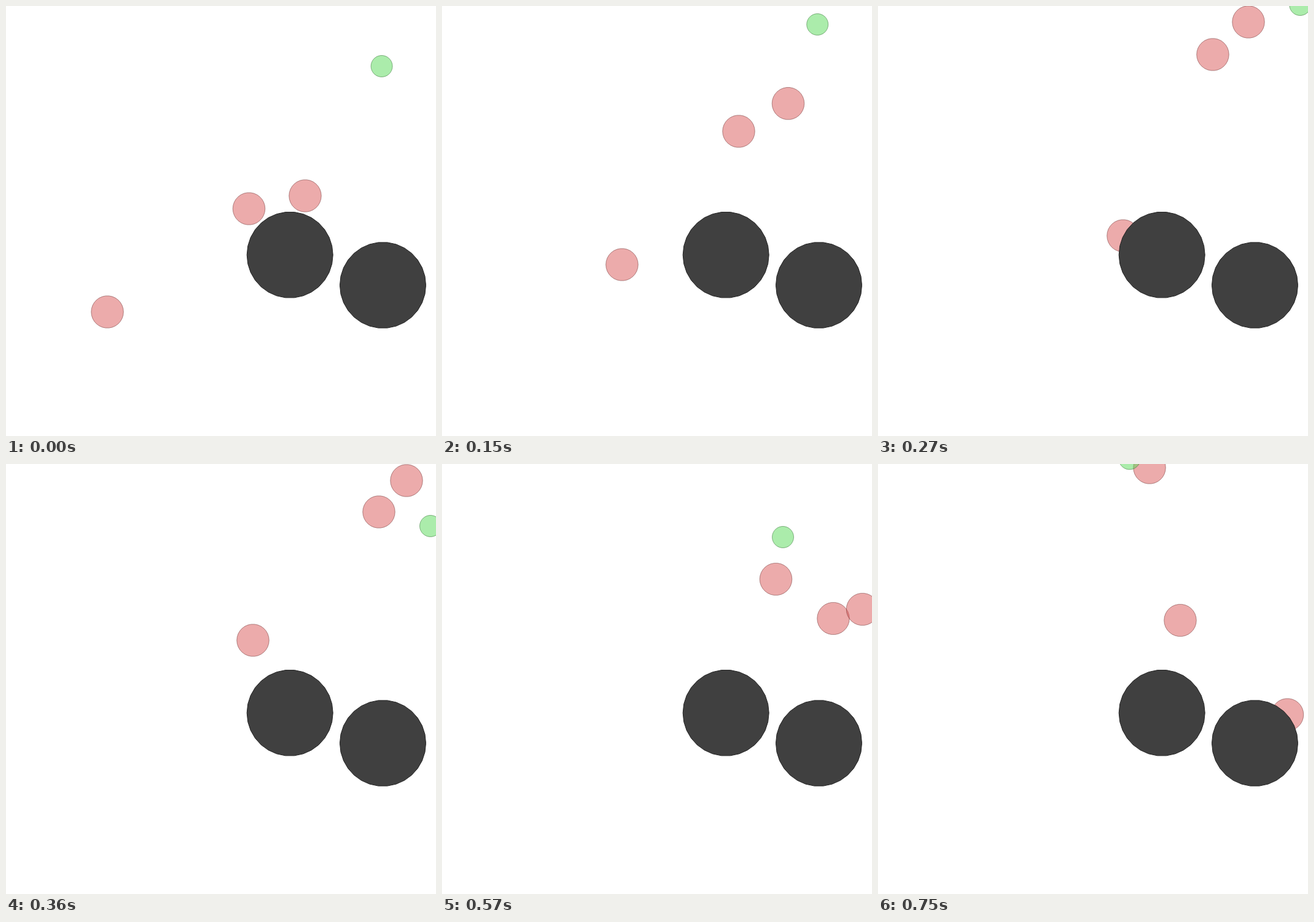
Write an HTML page with a canvas that moves like this. It is 700 px wide and 700 px high and loops after 780 ms.

```html
<!DOCTYPE html>
<html lang="en">
<head>
<meta charset="utf-8">
<title>Pursuit</title>
<style>
  html, body { margin: 0; width: 100%; height: 100%; overflow: hidden; background: #fff; }
  canvas { display: block; width: 700px; height: 700px; }
</style>
</head>
<body>
<canvas id="stage" width="700" height="700"></canvas>
<script>
const ctx = document.getElementById("stage").getContext("2d");
const STEP_MS = 30, STEPS = 26, SIDES = 30;
const RED = [217, 89, 89], GREEN = [89, 217, 89], GREY = [64, 64, 64];

// Every route passes through its key points at these shared steps.
const keySteps = [0, 5, 7, 9, 12, 15, 19, 21, 25];

const chaser = route => ({ color: RED, radius: 26.25, route });
const runner = route => ({ color: GREEN, radius: 17.5, route });

const agents = [
  chaser([[165, 498], [293, 421], [351, 393], [399, 374], [402, 287],
          [473.6, 237], [543.5, 187.5], [517, 123], [442, 6]]),
  chaser([[395.5, 330], [483, 204], [514, 142], [545, 79], [607, 78],
          [652, 152], [637, 251.5], [601.3, 266], [492, 254.5]]),
  chaser([[487, 309], [563.5, 158.7], [583, 92], [603, 26], [652, 27],
          [669.8, 104], [684.5, 236.5], [676.7, 306], [666.5, 408]]),
  runner([[611.6, 98], [611.2, 30], [639, -25], [687.2, -2], [691, 101],
          [610, 213.4], [555, 119], [520.6, 61.2], [409.5, -8.5]])
];

const obstacles = [[462.2, 405.2], [613.5, 454.5]];

// Slope of a smooth curve at key i: neighbouring chords, weighted by nearness.
function slope(values, i) {
  const chord = j => (values[j + 1] - values[j]) / (keySteps[j + 1] - keySteps[j]);
  const last = keySteps.length - 1;
  if (i === 0) return 1.5 * chord(0) - 0.5 * slope(values, 1);
  if (i === last) return 1.5 * chord(last - 1) - 0.5 * slope(values, last - 1);
  const before = keySteps[i] - keySteps[i - 1], after = keySteps[i + 1] - keySteps[i];
  return (chord(i - 1) * after + chord(i) * before) / (before + after);
}

function splineAt(values, step) {
  const i = Math.max(1, keySteps.findIndex(key => key >= step)) - 1;
  const span = keySteps[i + 1] - keySteps[i];
  const s = (step - keySteps[i]) / span, rest = 1 - s;
  return rest * rest * ((1 + 2 * s) * values[i] + s * span * slope(values, i))
       + s * s * ((3 - 2 * s) * values[i + 1] - rest * span * slope(values, i + 1));
}

const rgba = (color, alpha) => `rgba(${color.join()},${alpha})`;

function disc(x, y, radius, color, alpha) {
  ctx.beginPath();
  for (let i = 0; i < SIDES; i++) {
    const angle = 2 * Math.PI * i / SIDES;
    ctx.lineTo(x + radius * Math.cos(angle), y + radius * Math.sin(angle));
  }
  ctx.closePath();
  ctx.fillStyle = rgba(color, alpha);
  ctx.fill();
  ctx.strokeStyle = rgba(color.map(c => c / 2), alpha);
  ctx.lineWidth = 1;
  ctx.stroke();
}

function draw(step) {
  ctx.fillStyle = "#fff";
  ctx.fillRect(0, 0, 700, 700);
  for (const { route, radius, color } of agents) {
    const [x, y] = [0, 1].map(axis => splineAt(route.map(point => point[axis]), step));
    disc(x, y, radius, color, 0.5);
  }
  for (const [x, y] of obstacles) disc(x, y, 70, GREY, 1);
}

const start = performance.now();

function tick() {
  const elapsed = Math.max(0, performance.now() - start);
  draw(Math.floor(elapsed / STEP_MS) % STEPS);
  requestAnimationFrame(tick);
}
tick();
</script>
</body>
</html>
```
